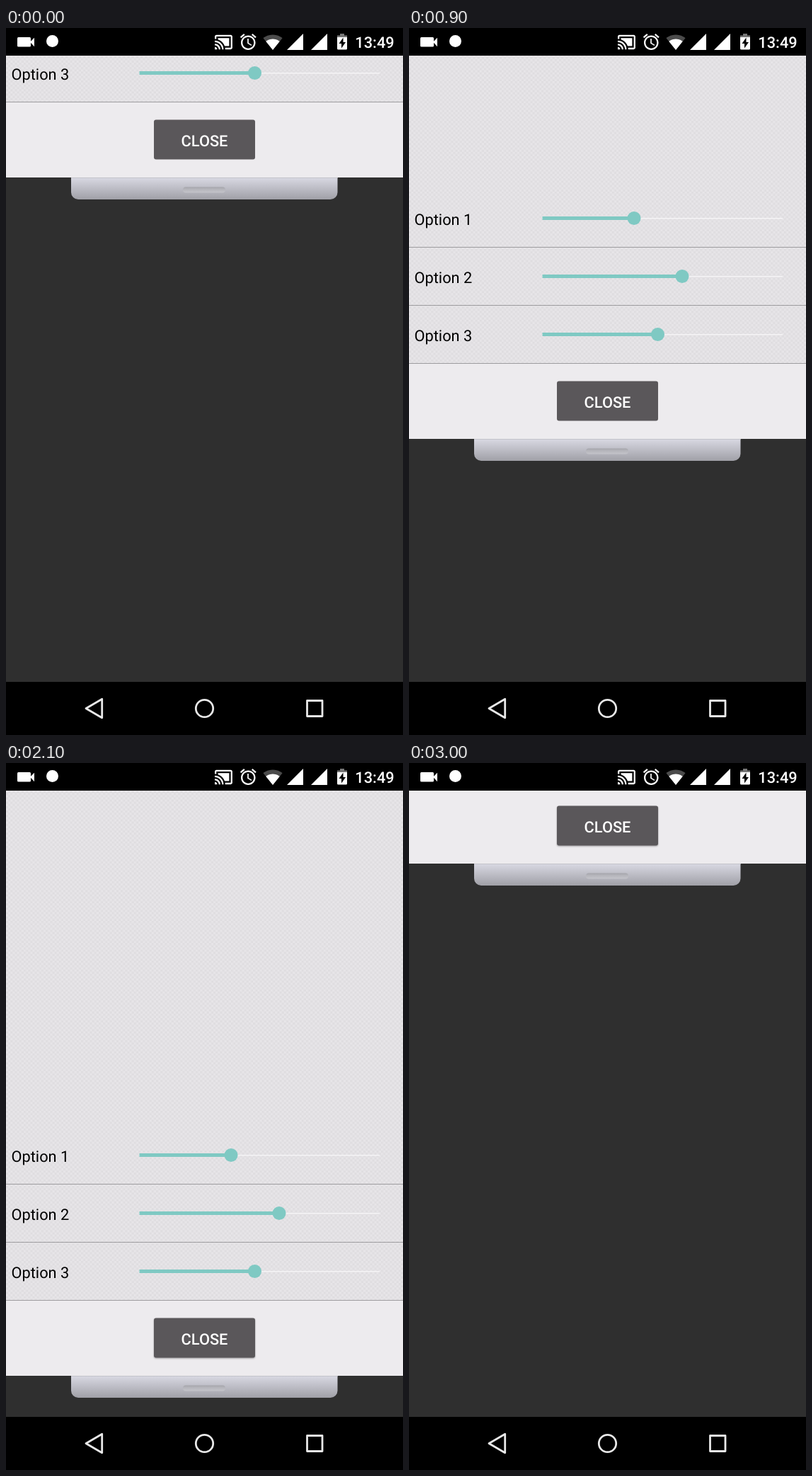
Animation of 561 by 998 pixels, one loop 3100 ms. Source, as an HTML page:

```html
<!DOCTYPE html>
<html lang="en">
<head>
<meta charset="utf-8">
<title>Sliding options panel</title>
<style>
  html, body { margin: 0; width: 100%; height: 100%; overflow: hidden; background: #000; }
  svg { display: block; width: 561px; height: 998px; }
  text { font: 21.8px Roboto, sans-serif; text-rendering: geometricPrecision; }
  .medium { font-weight: 500; text-anchor: middle; fill: #fff; }
  .raised { filter: drop-shadow(0 1.5px 1px rgba(0, 0, 0, .35)); }
</style>
</head>
<body>
<svg viewBox="0 0 561 998">
  <defs>
    <pattern id="weave" width="12" height="12" patternUnits="userSpaceOnUse" patternTransform="scale(.5195)">
      <path fill="#e7e5e8" d="M0 0h12v12H0z"/>
      <path fill="#dfdde0" d="M0 0h6v6H0zM6 6h6v6H6z"/>
    </pattern>
    <linearGradient id="metal" x2="0" y2="1">
      <stop stop-color="#d9d9e3"/>
      <stop offset="1" stop-color="#a0a0a7"/>
    </linearGradient>
    <linearGradient id="groove" x2="0" y2="1">
      <stop stop-color="#a4a4aa"/>
      <stop offset=".35" stop-color="#b4b4ba"/>
      <stop offset="1" stop-color="#c4c4ca"/>
    </linearGradient>
  </defs>

  <path fill="#2f2f2f" d="M0 39h561v884H0z"/>

  <!-- Panel: y = 0 is its lower edge -->
  <g id="panel">
    <path fill="url(#weave)" d="M0-853h561v747H0z"/>
    <path fill="#edebee" d="M0-106.5h561V0H0z"/>
    <g id="rows"></g>
    <rect id="button" x="209" y="-81.5" width="143" height="56" rx="3" fill="#5a575a"/>
    <text class="medium" x="280.5" y="-44.5">CLOSE</text>
    <path fill="url(#metal)" d="M92 0h376.500v21a10 10 0 0 1-10 10H102a10 10 0 0 1-10-10z"/>
    <path fill="#c3c3ca" d="M92 0h376.500v1H92z"/>
    <rect x="250" y="13.5" width="60" height="8" rx="4" fill="url(#groove)"/>
  </g>

  <!-- Status bar -->
  <path d="M0 0h561v39H0z"/>
  <g fill="#fff">
    <rect x="16" y="13" width="19" height="13.5" rx="1.5"/>
    <path d="M34 19.7l6-6v12.5z"/>
    <circle cx="65.5" cy="18.5" r="8.5"/>
    <path transform="translate(293.9 6.4) scale(1.13)" d="M1 18v3h3c0-1.66-1.34-3-3-3zm0-4v2c2.76 0 5 2.24 5 5h2c0-3.87-3.13-7-7-7zm18-7H5v1.63c3.96 1.28 7.09 4.41 8.37 8.37H19V7zM1 10v2c4.97 0 9 4.03 9 9h2c0-6.08-4.93-11-11-11zm20-7H3c-1.1 0-2 .9-2 2v3h2V5h18v14h-7v2h7c1.1 0 2-.9 2-2V5c0-1.1-.9-2-2-2z"/>
    <path transform="translate(328.6 5.9) scale(1.14)" d="M22 5.72l-4.6-3.86-1.29 1.53 4.6 3.86L22 5.72zM7.88 3.39L6.6 1.86 2 5.71l1.29 1.53 4.59-3.85zM12.5 8H11v6l4.75 2.85.75-1.23-4-2.37V8zM12 4c-4.97 0-9 4.03-9 9s4.02 9 9 9 9-4.03 9-9-4.03-9-9-9zm0 16c-3.87 0-7-3.13-7-7s3.13-7 7-7 7 3.13 7 7-3.13 7-7 7z"/>
    <g transform="translate(363.1 6.1) scale(1.16)">
      <path fill="#4b4b4b" d="M12 21.500L23.640 7C23.190 6.660 18.710 3 12 3S.810 6.660.360 7z"/>
      <path d="M12 21.500l8.470-10.550C20.040 10.620 16.810 8 12 8s-8.040 2.620-8.470 2.950z"/>
    </g>
    <path d="M420 8v23h-23zM454 8v23h-23z"/>
    <path d="M468 12h14v17a1.500 1.500 0 0 1-1.500 1.500h-11a1.500 1.500 0 0 1-1.500-1.500z"/>
    <path fill="#777" d="M472 8h6v2.500h4V13h-14v-2.500h4z"/>
    <path fill="#000" d="M476.500 13.500l-6 8.500h3.500v6.500l6-8.500h-3.500z"/>
  </g>
  <text class="medium" x="521" y="28">13:49</text>

  <!-- Navigation bar -->
  <path d="M0 923h561v75H0z"/>
  <g fill="none" stroke="#e8e8e8" stroke-width="2.800" stroke-linejoin="round">
    <path d="M113 960.500l22.700-13.200v26.400z"/>
    <circle cx="280.500" cy="960.500" r="12.200"/>
    <path d="M425.500 949.500h21.500v22h-21.500z"/>
  </g>
</svg>
<script>
  const STEP = 100;
  // Lower edge of the panel at each step: drag open, rest, drag closed.
  const edge = [
    211, 234, 263, 297, 337.5, 388, 443, 487, 532, 580, 631, 684, 737,
    789, 836, 872, 892, 892, 892, 892, 892,
    865, 825, 778, 725, 664.5, 587, 490, 370, 245, 142
  ];
  const RAISED_FROM = 16;
  const thumbs = [318, 386, 351.5];
  const panel = document.getElementById('panel');
  const button = document.getElementById('button');

  document.getElementById('rows').innerHTML = thumbs.map((x, i) => {
    const y = -147.5 - 82 * (thumbs.length - 1 - i);
    return `<text x="7.5" y="${y + 9}">Option ${i + 1}</text>
      <path fill="#f5f4f6" d="M188 ${y - 0.5}h340v1.5H188z"/>
      <path fill="#7fc9c3" d="M188.5 ${y - 2.5}H${x}v5H188.5z"/>
      <circle cx="${x}" cy="${y}" r="9.5" fill="#7fc9c3"/>
      <path fill="#9d9c9f" d="M0 ${y + 40.5}h561v1H0z"/>`;
  }).join('');

  function draw(now) {
    const i = Math.floor(now / STEP) % edge.length;
    panel.setAttribute('transform', `translate(0 ${edge[i]})`);
    button.classList.toggle('raised', i >= RAISED_FROM);
  }

  function tick() {
    draw(performance.now() - start);
    requestAnimationFrame(tick);
  }

  const start = performance.now();
  tick();
</script>
</body>
</html>
```
